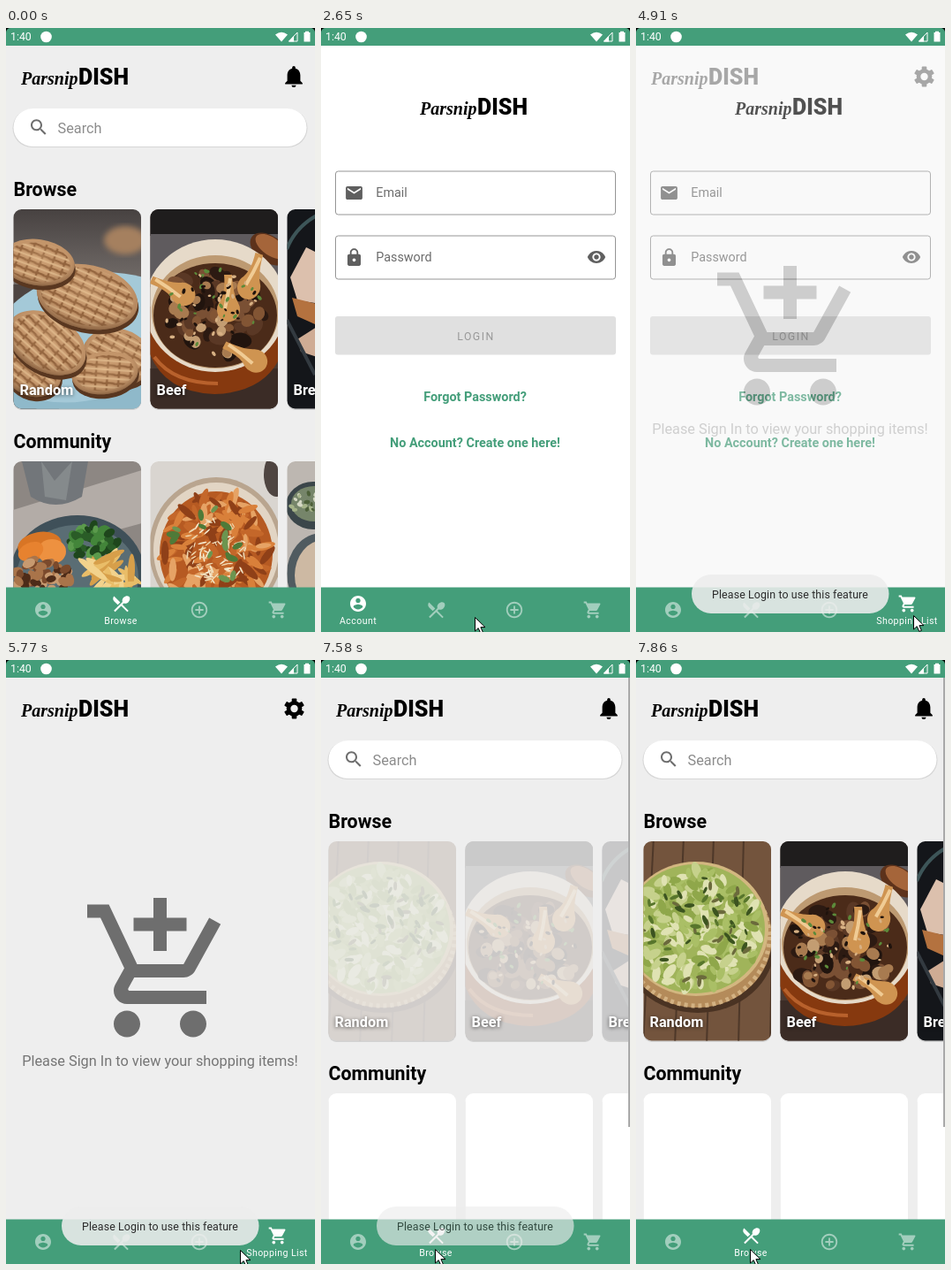
Recreate the animation shown at these times as an HTML page. Size 350 px wide and 683 px high, loop 8000 ms.

```html
<!DOCTYPE html>
<html lang="en">
<head>
<meta charset="utf-8">
<title>Recipe app</title>
<style>
  html, body { margin: 0; width: 100%; height: 100%; overflow: hidden; background: #000; }
  svg { display: block; width: 350px; height: 683px; font-family: Roboto, sans-serif; }
  .caption { filter: drop-shadow(0 1px 2px rgba(0, 0, 0, .6)); }
</style>
</head>
<body>
<svg id="stage" viewBox="0 0 350 683"></svg>
<script>
const GREEN = '#449e7a', PAGE = '#eee';
const stage = document.getElementById('stage');

const ICONS = {
  account: 'M12 2C6.48 2 2 6.48 2 12s4.48 10 10 10 10-4.48 10-10S17.52 2 12 2zm0 3c1.66 0 3 1.34 3 3s-1.34 3-3 3-3-1.34-3-3 1.34-3 3-3zm0 14.2c-2.5 0-4.71-1.28-6-3.22.03-1.99 4-3.08 6-3.08 1.99 0 5.97 1.09 6 3.08-1.29 1.94-3.5 3.22-6 3.22z',
  cutlery: 'M8.1 13.34l2.83-2.83L3.91 3.5c-1.56 1.56-1.56 4.09 0 5.66l4.19 4.18zm6.78-1.81c1.53.71 3.68.21 5.27-1.38 1.91-1.91 2.28-4.65.81-6.12-1.46-1.46-4.2-1.1-6.12.81-1.59 1.59-2.09 3.74-1.38 5.27L3.7 19.87l1.41 1.41L12 14.41l6.88 6.88 1.41-1.41L13.41 13l1.47-1.47z',
  add: 'M13 7h-2v4H7v2h4v4h2v-4h4v-2h-4V7zm-1-5C6.48 2 2 6.48 2 12s4.48 10 10 10 10-4.48 10-10S17.52 2 12 2zm0 18c-4.41 0-8-3.59-8-8s3.59-8 8-8 8 3.59 8 8-3.59 8-8 8z',
  cart: 'M7 18c-1.1 0-2 .9-2 2S5.9 22 7 22s2-.9 2-2-.9-2-2-2zM1 2v2h2l3.6 7.59-1.35 2.45c-.16.28-.25.61-.25.96 0 1.1.9 2 2 2h12v-2H7.42c-.14 0-.25-.11-.25-.25l.03-.12.9-1.63h7.45c.75 0 1.41-.41 1.75-1.03l3.58-6.49c.08-.14.12-.31.12-.48 0-.55-.45-1-1-1H5.21l-.94-2H1zm16 16c-1.1 0-2 .9-2 2s.9 2 2 2 2-.9 2-2-.9-2-2-2z',
  addCart: 'M11 9h2V6h3V4h-3V1h-2v3H8v2h3v3zm-4 9c-1.1 0-2 .9-2 2S5.9 22 7 22s2-.9 2-2-.9-2-2-2zm10 0c-1.1 0-2 .9-2 2s.9 2 2 2 2-.9 2-2-.9-2-2-2zm-9.83-3.25l.03-.12.9-1.63h7.45c.75 0 1.41-.41 1.75-1.03l3.86-7.01L19.42 4l-3.87 7H8.53L4.27 2H1v2h2l3.6 7.59-1.35 2.45c-.16.28-.25.61-.25.96 0 1.1.9 2 2 2h12v-2H7.42c-.13 0-.25-.11-.25-.25z',
  bell: 'M12 22c1.1 0 2-.9 2-2h-4c0 1.1.89 2 2 2zm6-6v-5c0-3.07-1.64-5.64-4.5-6.32V4c0-.83-.67-1.5-1.5-1.5s-1.5.67-1.5 1.5v.68C7.63 5.36 6 7.92 6 11v5l-2 2v1h16v-1l-2-2z',
  search: 'M15.5 14h-.79l-.28-.27C15.41 12.59 16 11.11 16 9.5 16 5.91 13.09 3 9.5 3S3 5.91 3 9.5 5.91 16 9.5 16c1.61 0 3.09-.59 4.23-1.57l.27.28v.79l5 4.99L20.49 19l-4.99-5zm-6 0C7.01 14 5 11.99 5 9.5S7.01 5 9.5 5 14 7.01 14 9.5 11.99 14 9.5 14z',
  mail: 'M20 4H4c-1.1 0-2 .9-2 2v12c0 1.1.9 2 2 2h16c1.1 0 2-.9 2-2V6c0-1.1-.9-2-2-2zm0 4l-8 5-8-5V6l8 5 8-5v2z',
  lock: 'M18 8h-1V6c0-2.76-2.24-5-5-5S7 3.24 7 6v2H6c-1.1 0-2 .9-2 2v10c0 1.1.9 2 2 2h12c1.1 0 2-.9 2-2V10c0-1.1-.9-2-2-2zm-6 9c-1.1 0-2-.9-2-2s.9-2 2-2 2 .9 2 2-.9 2-2 2zm3.1-9H8.9V6c0-1.71 1.39-3.1 3.1-3.1s3.1 1.39 3.1 3.1v2z',
  eye: 'M12 4.5C7 4.5 2.73 7.61 1 12c1.73 4.39 6 7.5 11 7.5s9.27-3.11 11-7.5c-1.73-4.39-6-7.5-11-7.5zM12 17c-2.76 0-5-2.24-5-5s2.24-5 5-5 5 2.24 5 5-2.24 5-5 5zm0-8c-1.66 0-3 1.34-3 3s1.34 3 3 3 3-1.34 3-3-1.34-3-3-3z'
};

// Drawing helpers
const icon = (name, cx, cy, s, fill) =>
  `<path d="${ICONS[name]}" fill="${fill}" transform="translate(${cx - 12 * s} ${cy - 12 * s}) scale(${s})"/>`;
const text = (x, y, size, str, attrs = '') =>
  `<text x="${x}" y="${y}" font-size="${size}" ${attrs}>${str}</text>`;
const rect = (x, y, w, h, fill, attrs = '') =>
  `<rect x="${x}" y="${y}" width="${w}" height="${h}" fill="${fill}" ${attrs}/>`;
const oval = (x, y, rx, ry, fill, turn = 0, attrs = '') =>
  `<ellipse rx="${rx}" ry="${ry}" fill="${fill}" transform="translate(${x} ${y}) rotate(${turn})" ${attrs}/>`;
const path = (d, fill, attrs = '') => `<path d="${d}" fill="${fill}" ${attrs}/>`;

let seed = 7;
const random = () => (seed = (seed * 16807) % 2147483647) / 2147483647;
function scatter(n, cx, cy, rx, ry, w, h, colors) {
  let out = '';
  for (let i = 0; i < n; i++) {
    const a = random() * 2 * Math.PI, r = Math.sqrt(random()), k = .7 + random() * .6;
    out += oval((cx + r * rx * Math.cos(a)).toFixed(1), (cy + r * ry * Math.sin(a)).toFixed(1),
      (w * k).toFixed(1), (h * k).toFixed(1), colors[i % colors.length], Math.round(random() * 180));
  }
  return out;
}

// Food pictures
const cookie = (x, y, rx, ry, turn) =>
  oval(x + 1, y + 5, rx, ry, '#593720', turn) + oval(x, y, rx, ry, '#c3956a', turn) +
  oval(x, y, rx - 5, ry - 4, 'url(#hatch)', turn) + oval(x, y, rx, ry, 'url(#shade)', turn);
const cookies = () =>
  rect(8, 205, 146, 226, 'url(#table)') + oval(135, 240, 24, 16, '#a5805f', 0, 'filter="url(#blur)"') +
  path('M8 290L40 290 60 431H8Z', '#4d4441') + oval(110, 362, 125, 86, '#a4c9d8') +
  path('M8 412Q80 440 154 400V431H8Z', '#8fb9ca') +
  cookie(126, 372, 40, 32, 15) + cookie(112, 390, 38, 24, -8) + cookie(30, 388, 34, 28, 25) +
  cookie(46, 356, 48, 32, 30) + cookie(92, 304, 58, 36, 12) + cookie(36, 265, 42, 26, 8);
const onion = (x, y, turn) =>
  path('M4-30Q5-8 11 2A13 14 0 1 1-11 2Q-3-8-5-30Z', '#cf9451', `transform="translate(${x} ${y}) rotate(${turn})"`) +
  path('M2-26Q0-8-4 8', 'none', `stroke="#f0cb94" stroke-width="4" transform="translate(${x} ${y}) rotate(${turn})"`);
const stew = () =>
  rect(163, 205, 146, 226, '#4b3a32') + rect(163, 205, 146, 30, '#1f1d1d') + rect(163, 233, 146, 60, '#5f5b5e') +
  path('M163 385H309V431H163Z', '#3b2c26') +
  oval(298, 250, 24, 15, '#5d321b', 35) + oval(300, 247, 20, 10, '#a5653a', 35) +
  path('M160 315V360Q175 412 236 414 300 412 315 360V315Z', '#86390f') +
  path('M168 372Q190 402 240 402', 'none', 'stroke="#b8612c" stroke-width="4"') +
  oval(237, 314, 80, 75, '#e6dac9') + oval(237, 321, 72, 64, '#bd9a72') + oval(237, 325, 70, 59, '#4b2b19') +
  scatter(46, 232, 324, 60, 48, 10, 7, ['#2c1a12', '#5a3825', '#7a5034', '#21140e']) +
  scatter(22, 236, 332, 58, 44, 7, 6, ['#a87b50', '#825534', '#c39d72']) +
  onion(252, 309, 0) + onion(192, 297, -65) + onion(274, 372, -62) + onion(278, 284, 18) +
  scatter(60, 235, 322, 60, 50, 2.5, 1.5, ['#5c8a3a', '#d8b184', '#1e120c']);
const bread = () =>
  rect(318, 205, 40, 226, '#14161a') + path('M318 250Q328 225 352 212', 'none', 'stroke="#3d5558" stroke-width="4"') +
  path('M322 282L340 248 356 256V312L330 308Z', '#dcc0ad') + path('M324 305L352 312V336L330 326Z', '#b4723f') +
  path('M330 352L352 338V372L334 366Z', '#cfac94') + path('M318 330L350 392', 'none', 'stroke="#333a40" stroke-width="4"');
const steak = () =>
  rect(8, 490, 146, 150, '#8d8783') + path('M8 545L154 500V560L8 600Z', '#b3aca7') +
  path('M18 490H93L86 530Q56 548 28 530Z', '#72767a') + path('M40 490L55 512 75 490 68 534 44 530Z', '#858a8c') +
  oval(81, 617, 76, 66, '#3f5059') + oval(81, 621, 69, 59, '#5a6d74') +
  oval(38, 585, 25, 15, '#d87525', -10) + oval(52, 592, 16, 14, '#ed9140') + oval(28, 592, 15, 10, '#e7822f', -25) +
  scatter(60, 100, 581, 27, 19, 6, 4, ['#2a5c27', '#43853a', '#1e461c', '#5b9a4c']) +
  scatter(60, 42, 620, 34, 19, 6, 4, ['#7b4a2c', '#a9744a', '#4d2b18', '#c79a70']) +
  scatter(26, 118, 620, 26, 24, 17, 3.5, ['#e9bd68', '#f2d28c', '#d79f4a']);
const pasta = () =>
  rect(163, 490, 146, 150, '#d9d5d0') + oval(306, 505, 14, 25, '#4f4541') +
  oval(238, 589, 76, 81, '#b9a58f') + oval(238, 590, 71, 76, '#e2d5c4') + oval(238, 594, 64, 70, '#b65a22') +
  scatter(150, 238, 594, 59, 68, 11, 3.5, ['#d9803a', '#c4672a', '#e6a365', '#8f4018']) +
  scatter(80, 238, 592, 36, 38, 4, .8, ['#f4e7cb', '#eed6ae']) +
  scatter(16, 235, 582, 48, 48, 6, 3, ['#4f7a38', '#6c9550']);
const bowls = () =>
  rect(318, 490, 40, 150, '#bdb7b1') + oval(348, 540, 31, 27, '#3b464a') + oval(349, 538, 26, 20, '#76856a') +
  scatter(24, 345, 538, 22, 16, 3, 2, ['#a5b388', '#4d6039', '#d5d8c4']) +
  oval(358, 617, 40, 46, '#505b60') + oval(360, 619, 33, 40, '#cdb9a3');
const quiche = () => {
  let planks = rect(8, 205, 146, 226, '#73543d');
  for (let i = 0; i < 5; i++) planks += path(`M${20 + i * 34} 200L${8 + i * 36} 435`, 'none', 'stroke="#4e3829" stroke-width="2"');
  return planks + oval(70, 323, 87, 76, '#4a3323') + oval(69, 314, 85, 79, '#b48b5a') +
    oval(69, 313, 82, 78, 'none', 0, 'stroke="#d3b283" stroke-width="5" stroke-dasharray="4 4"') +
    oval(68, 304, 82, 76, '#d3b780') + oval(67, 304, 79, 73, '#a0b45a') +
    scatter(260, 67, 304, 73, 67, 8, 4, ['#c6d18c', '#8fa74a', '#dfe2b2', '#aabf66']) +
    scatter(60, 67, 304, 70, 62, 5, 2, ['#58762c', '#6b6a3c', '#3c5420']);
};

// Pages
const cardX = i => 8.5 + 155 * (i % 3), cardY = i => i < 3 ? 205 : 490;
const cardShape = (i, fill, dy = 0) => rect(cardX(i), cardY(i) + dy, 144.5, 225.5, fill, 'rx="9"');
const photo = (i, content) => `<g clip-path="url(#card${i})">${content}</g>`;
const wordmark = (x, y) =>
  text(x, y, 20, 'Parsnip', `font-family="Liberation Serif, serif" font-style="italic" font-weight="700"`) +
  text(x + 65, y, 25, 'DISH', 'font-weight="900"');

function browsePage(photos, cardFill) {
  let cards = '';
  for (let i = 0; i < 6; i++) cards += cardShape(i, '#d2d2d2', 1.5) + cardShape(i, i < 3 ? cardFill : '#fff');
  const heading = (y, str) => text(8.5, y, 21.4, str, 'font-weight="700"');
  const caption = (i, str) => text(cardX(i) + 7, 415, 16.3, str, 'font-weight="700" fill="#fff" class="caption"');
  return rect(0, 20, 350, 663, PAGE) + wordmark(17, 64) + icon('bell', 326, 54.8, 1.23, '#000') +
    rect(7.5, 91.5, 334, 43.5, '#d6d6d6', 'rx="21.7"') + rect(8.5, 91, 332, 43, '#fff', 'rx="21.5"') +
    icon('search', 37, 112.3, 1, '#6e6e6e') + text(58.5, 118.5, 16.3, 'Search', 'fill="#8c8c8c"') +
    heading(190, 'Browse') + heading(475, 'Community') + cards + photos +
    caption(0, 'Random') + caption(1, 'Beef') + caption(2, 'Breakfast');
}

function loginPage() {
  const field = (y, name, label) =>
    rect(16.5, y, 317, 49, 'none', 'rx="3" stroke="#959595"') + icon(name, 37.5, y + 24.5, .94, '#5f5f5f') +
    text(62.3, y + 29, 14.3, label, 'fill="#6b6b6b"');
  const link = (y, str) =>
    text(174.5, y, 14.4, str, `fill="${GREEN}" font-weight="700" text-anchor="middle"`);
  return rect(0, 20, 350, 663, '#fff') + wordmark(112, 97.5) +
    field(162, 'mail', 'Email') + field(235, 'lock', 'Password') + icon('eye', 312, 259, .92, '#5f5f5f') +
    rect(16, 326, 318, 43.5, '#e0e0e0', 'rx="3"') +
    text(175.5, 352.5, 12.3, 'LOGIN', 'fill="#999" text-anchor="middle" letter-spacing="1.5"') +
    link(422, 'Forgot Password?') + link(474, 'No Account? Create one here!');
}

function cartPage() {
  let gear = '';
  for (const a of [0, 60, 120]) gear += rect(-2.8, -11.6, 5.6, 23.2, '#000', `rx="1" transform="rotate(${a})"`);
  return rect(0, 20, 350, 663, PAGE) + wordmark(17, 64) +
    `<g transform="translate(326.5 55)">${gear}<circle r="8.8"/><circle r="4.2" fill="${PAGE}"/></g>` +
    icon('addCart', 174.5, 351.5, 7.5, '#6e6e6e') +
    text(174.5, 459, 16.3, 'Please Sign In to view your shopping items!', 'fill="#757575" text-anchor="middle"');
}

const statusBar = rect(0, 0, 350, 30, '#000') + rect(0, 0, 350, 30, GREEN, 'rx="5"') +
  text(5, 14, 12.3, '1:40', 'fill="#fff"') + '<circle cx="45.5" cy="10" r="6.3" fill="#fff"/>' +
  path('M305 7.5Q312 2 319 7.5L312 15.5Z', '#fff') + path('M320.5 15L330 5V15Z', 'none', 'stroke="#fff"') +
  path('M320 15.5L326 9V15.5Z', '#fff') + path('M337.5 5H339V3.8H343V5H344.5V15.5H337.5Z', '#fff');

const TABS = [['account', 42, .9, 'Account', 42], ['cutlery', 130.5, 1, 'Browse', 130],
  ['add', 219, .92, '', 219], ['cart', 308, .94, 'Shopping List', 307]];
const tabs = TABS.map(([name, x, s, label, labelX], i) => `<g id="tab${i}"><g id="glyph${i}">${icon(name, x, 658, s, '#fff')}</g>` +
  text(labelX, 674, 10.6, label, `id="label${i}" fill="#fff" text-anchor="middle" letter-spacing=".4"`) + '</g>').join('');

const clips = [0, 1, 2, 3, 4, 5].map(i => `<clipPath id="card${i}">${cardShape(i, '#000')}</clipPath>`).join('');

stage.innerHTML = `<defs>${clips}
  <linearGradient id="table" x2="0" y2="1"><stop stop-color="#474241"/><stop offset=".4" stop-color="#77706d"/><stop offset="1" stop-color="#574a45"/></linearGradient>
  <radialGradient id="shade" cy=".4" r=".62"><stop stop-color="#f0c898" stop-opacity=".3"/><stop offset=".6" stop-color="#c3956a" stop-opacity="0"/><stop offset="1" stop-color="#4a2b16" stop-opacity=".55"/></radialGradient>
  <pattern id="hatch" width="13" height="10" patternUnits="userSpaceOnUse" patternTransform="rotate(12)">
    <path d="M0 2Q6 0 13 2M3 0V10" fill="none" stroke="#91623c" stroke-width="2.4"/><path d="M0 6H13" stroke="#dab386" stroke-width="2.4"/></pattern>
  <filter id="blur"><feGaussianBlur stdDeviation="3"/></filter></defs>
  ${statusBar}
  <g>${browsePage(photo(0, cookies()) + photo(1, stew()) + photo(2, bread()) +
    photo(3, steak()) + photo(4, pasta()) + photo(5, bowls()), '#fff')}
    ${path('M52 133.5H324', 'none', 'id="underline" stroke="#c4c4c4"')}</g>
  <g id="login">${loginPage()}</g>
  <g id="cart">${cartPage()}</g>
  <g id="reload">${browsePage(`<g id="photos">${photo(0, quiche()) + photo(1, stew()) + photo(2, bread())}</g>`, '#ececec')}
    ${rect(348, 20, 2, 508, '#a9a9a9')}</g>
  ${rect(0, 632.5, 350, 50.5, GREEN)}${tabs}
  <circle id="ripple" cx="227" cy="659" r="12" fill="#fff" opacity=".15"/>
  <g id="toast">${rect(63, 618, 223.5, 44, '#ededed', 'rx="22" fill-opacity=".88"')}
    ${text(174.5, 645, 12.4, 'Please Login to use this feature', 'fill="#2b2b2b" text-anchor="middle" letter-spacing=".12"')}</g>
  ${path('M.5 .5V16L4.2 12.6 6.8 18.4 9.4 17.3 6.9 11.6H12Z', '#fff', 'id="cursor" stroke="#000"')}`;

// Timeline
const LOOP = 8000;
const POINTER = [[580, 340, 676], [850, 225, 672], [1100, 108, 664], [1310, 54, 657], [1410, 52, 657],
  [2400, 52, 657], [2650, 174, 666], [2900, 225, 658], [4110, 225, 658], [4290, 255, 662], [4620, 314, 664],
  [5480, 314, 664], [5770, 265, 667], [6280, 149, 668], [6620, 129, 666], [LOOP, 129, 666]];
const HIGHLIGHTS = [[1620, 1900, 1, 0], [4600, 4720, 0, 3], [6770, 6940, 3, 1]];

const byId = id => document.getElementById(id);
const fade = (id, value) => byId(id).setAttribute('opacity', value);
const move = (id, x, y) => byId(id).setAttribute('transform', `translate(${x} ${y})`);
const ramp = (t, from, to) => Math.min(1, Math.max(0, (t - from) / (to - from)));

function pointerAt(t) {
  const i = Math.max(1, POINTER.findIndex(p => p[0] > t));
  const [t0, x0, y0] = POINTER[i - 1], [t1, x1, y1] = POINTER[i], k = ramp(t, t0, t1);
  return [Math.round(x0 + (x1 - x0) * k), Math.round(y0 + (y1 - y0) * k)];
}

function render(t) {
  fade('underline', t >= 1620 ? 1 : 0);
  fade('login', ramp(t, 2060, 2160));
  fade('cart', ramp(t, 4870, 4990));
  fade('reload', ramp(t, 7200, 7300));
  fade('photos', ramp(t, 7530, 7850));

  const raised = t < 2110 ? 1 : t < 4910 ? 0 : t < 7240 ? 3 : 1;
  const glow = [0, 1, 0, 0];
  for (const [start, end, from, to] of HIGHLIGHTS) {
    if (t < start) break;
    glow[to] = ramp(t, start, end);
    glow[from] = 1 - glow[to];
  }
  TABS.forEach((_, i) => {
    fade('tab' + i, .5 + .5 * glow[i]);
    fade('label' + i, i === raised ? 1 : 0);
    move('glyph' + i, 0, i === raised ? -7 : 0);
  });

  fade('ripple', t >= 3140 && t < 3220 ? .15 : 0);
  fade('toast', ramp(t, 3350, 3900) * (1 - ramp(t, 7480, 7860)));
  fade('cursor', t >= 580 ? 1 : 0);
  move('cursor', ...pointerAt(t));
}

function tick() {
  render(performance.now() % LOOP);
  requestAnimationFrame(tick);
}
tick();
</script>
</body>
</html>
```
